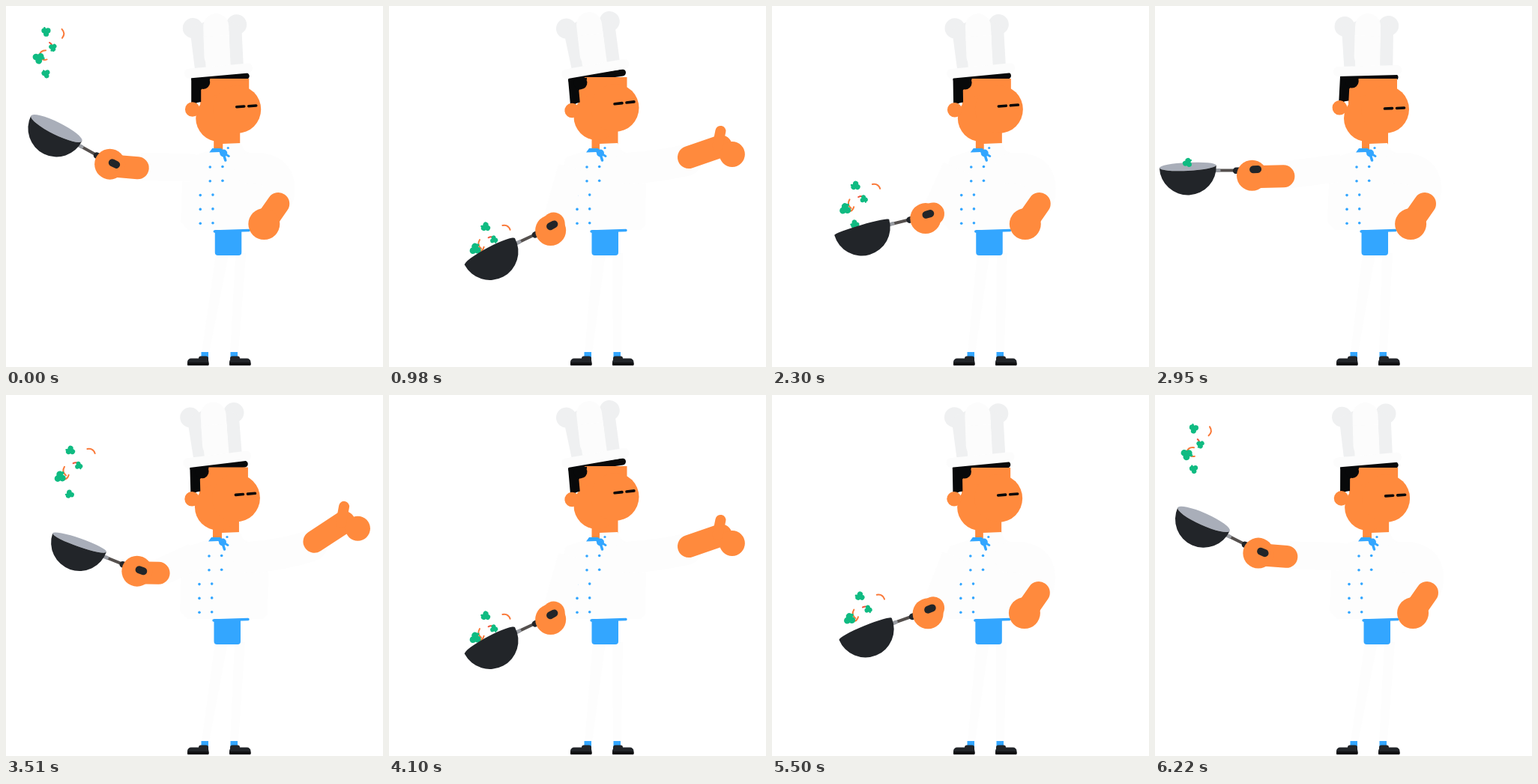
Animation of 503x482 px, one loop 6.24 s. Source, as an HTML page with a canvas:

```html
<!DOCTYPE html>
<html lang="en">
<head>
<meta charset="utf-8">
<title>Chef tossing vegetables</title>
<style>
html, body { margin: 0; width: 100%; height: 100%; overflow: hidden; background: #fff; }
canvas { display: block; }
</style>
</head>
<body>
<canvas id="stage" width="503" height="482"></canvas>
<script>
const c = document.getElementById('stage').getContext('2d');
const SKIN = '#ff8a3d', DARK = '#222529', BLUE = '#33a6ff', CLOTH = '#fdfdfd',
      GREY = '#eff0f1', GREEN = '#10bb82', RED = '#f0563c', HAIR = '#08090a';

// One toss: fling, sink, rest, wind up. The right arm gestures on every other toss.
const TOSS = 1560, FLING = -170, TOP = 130, CATCH = 980, WIND = 1230;

const level = { x: 43.5, y: 215, tilt: -3, rim: 5.5, drop: 16, armX: 42, armY: 1,
  body: -3, head: -1, headY: 0, turn: 3, hat: 0, hatY: 0, hatTurn: 2 };
const high = { x: 82, y: 159, tilt: 33, rim: 9, drop: 10, armX: 36, armY: 6,
  body: 1, head: .5, headY: 0, turn: -.7, hat: 0, hatY: 0, hatTurn: -2.5 };
const low = { x: 134.5, y: 328, tilt: -28, rim: -6, drop: 13, armX: 4, armY: -9,
  body: -8, head: -6.5, headY: -2, turn: -5, hat: -8, hatY: -2.5, hatTurn: -6.5 };
const lowCalm = { ...low, headY: 0, turn: -1, hat: -6, hatY: 0, hatTurn: -2 };

const lerp = (a, b, u) => a + (b - a) * u;
const span = (t, from, to) => Math.max(0, Math.min(1, (t - from) / (to - from)));
const smooth = u => u * u * (3 - 2 * u);
const easeOut = power => u => 1 - (1 - u) ** power;
const backOut = u => 1 + 2.7 * (u - 1) ** 3 + 1.7 * (u - 1) ** 2;

function blend(a, b, u, ease, special = {}) {
  const pose = {};
  for (const k in a) pose[k] = lerp(a[k], b[k], (special[k] || ease)(u));
  return pose;
}

function poseAt(q, bottom) {
  if (q < TOP)
    return blend(level, high, span(q, FLING, TOP), easeOut(2), { x: u => u ** .85, y: easeOut(3) });
  if (q < WIND) return blend(high, bottom, span(q, TOP, CATCH), smooth, { x: u => u });
  return blend(bottom, level, span(q, WIND, TOSS + FLING), smooth);
}

function poly(color, ...p) {
  c.fillStyle = color;
  c.beginPath();
  for (let i = 0; i < p.length; i += 2) c.lineTo(p[i], p[i + 1]);
  c.fill();
}
function disc(color, x, y, r) {
  c.fillStyle = color;
  c.beginPath();
  c.arc(x, y, r, 0, 7);
  c.fill();
}
function line(color, width, ...p) {
  c.strokeStyle = color;
  c.lineWidth = width;
  c.beginPath();
  for (let i = 0; i < p.length; i += 2) c.lineTo(p[i], p[i + 1]);
  c.stroke();
}
function box(color, x, y, w, h, r) {
  c.fillStyle = color;
  c.beginPath();
  c.roundRect(x, y, w, h, r);
  c.fill();
}
// Draw after moving by x, y and turning around px, py
function placed(x, y, deg, px, py, draw) {
  c.save();
  c.translate(x + px, y + py);
  c.rotate(deg * Math.PI / 180);
  c.translate(-px, -py);
  draw();
  c.restore();
}
function polar(x, y, r, deg) {
  const a = deg * Math.PI / 180;
  return [x + r * Math.cos(a), y + r * Math.sin(a)];
}

function legs(shift) {
  poly(CLOTH, 280 + shift, 330, 297 + shift, 330, 271, 463, 261, 463);
  poly(CLOTH, 306 + shift, 330, 320 + shift, 330, 310, 463, 299, 463);
  for (const [sock, shoe, heel] of [[260.5, 242, 257], [299.5, 298, 299]]) {
    box(BLUE, sock, 462, 9.5, 9, 0);
    box(DARK, heel, 467.5, 13, 11, 3);
    box(DARK, shoe, 470.5, 28.5, 9, [5, 5, 1, 1]);
    box('#0e0f11', shoe, 476, 28.5, 4, 1);
  }
}

function head(p) {
  const turned = draw => placed(p.head, p.headY, p.turn, 290, 115, draw);
  turned(() => line(HAIR, 9, 251.5, 97.5, 320, 93.5));
  placed(p.head, p.headY, 0, 0, 0, () => {
    box(SKIN, 277, 160, 35, 34, 0);
    box(SKIN, 259, 97, 65, 55, 0);
    disc(SKIN, 284, 150, 31);
    disc(SKIN, 308, 138, 32);
  });
  turned(() => {
    poly(HAIR, 247, 96, 272, 96, 272, 98, 260, 112, 260, 128, 255, 129, 247, 133);
    disc(HAIR, 263, 102, 9);
    disc(SKIN, 248.5, 138, 9.8);
  });
  placed(p.head, p.turn * .9, p.turn * .5, 320, 134, () => {
    line(HAIR, 3.6, 307.5, 134.7, 317.5, 134);
    line(HAIR, 3.6, 323.5, 133.7, 333.5, 133);
  });
  placed(p.hat, p.hatY, p.hatTurn, 284, 88, hat);
}

function hat() {
  disc(GREY, 251, 28.5, 13.5);
  disc(GREY, 309.5, 25.5, 13.5);
  poly(GREY, 247, 30, 268, 20, 268, 82, 252, 82);
  poly(GREY, 299, 20, 316, 30, 317, 80, 299, 80);
  box('#fcfcfc', 265, 10, 34, 74, 17);
  poly('#fcfcfc', 265, 40, 299, 40, 300, 84, 267, 84);
  placed(0, 0, -3.5, 284, 86, () => box('#fcfcfc', 238, 80, 91, 13, 6));
}

function torso() {
  poly(CLOTH, 268, 194, 318, 193, 345, 205, 351, 240, 350, 292, 344, 299,
    243, 299, 233, 288, 235, 235, 244, 202);
  poly(CLOTH, 289, 184, 313, 183, 320, 197, 289, 199);
  line(BLUE, 3.4, 278, 301, 324, 299.5);
  box(BLUE, 278.5, 299, 35.5, 34, [0, 0, 4, 4]);
  for (let i = 0; i < 5; i++) {
    const x = i < 2 ? 272 : 259, y = 215 + i * 18.8;
    disc(BLUE, x, y, 1.8);
    disc(BLUE, x + 16.7, y - .5, 1.8);
  }
  poly(BLUE, 271, 195.5, 275, 190, 287, 190, 292, 196, 289, 199, 284, 195);
  disc(BLUE, 290, 196.5, 5);
  line(BLUE, 3.5, 290, 198, 292.5, 206);
  line(BLUE, 3, 291, 197, 297, 200.5);
  disc(BLUE, 296, 189.5, 1.6);
}

// k: 0 = hand on the hip, 1 = stretched out
function rightArm(k) {
  const x = lerp(363, 408, k), y = lerp(264, 202, k);
  const length = lerp(33, 58, k), angle = lerp(125, -4, k);
  c.strokeStyle = CLOTH;
  c.lineWidth = 42;
  c.beginPath();
  c.moveTo(325, 217);
  c.quadraticCurveTo(370, 214, x - 4 * k, y - 10 + 14 * k);
  c.stroke();
  line(SKIN, 30, x, y, ...polar(x, y, length * .78, angle - 15 * k));
  disc(SKIN, ...polar(x, y, length, angle), lerp(21, 17, k));
  if (k > .05) {
    const [tx, ty] = polar(x, y, length * .76, angle - 16);
    line(SKIN, 14, tx - 3, ty, tx + 1, ty - 20 * k);
  }
}

const leaves = [[67, 10, 6.5], [53, 47, 8], [78, 31, 5.5], [66, 71, 6]];
const curls = [[95, 10, 7], [61, 48, 6], [59, 39, 7], [75, 28, 5]];

function panPoint(p, x, y) {
  return polar(...polar(p.x, p.y, x, p.tilt), y, p.tilt + 90);
}

// Place of a piece whose highest point is x, y
function piecePlace(x, y, q, p) {
  const lying = pan => panPoint(pan, (x - 67) * .6, Math.min(17, Math.hypot(x - 67, y - 10) - 4));
  if (q < TOP) {
    const [px, py] = lying(level), u = span(q, FLING, TOP);
    return [lerp(px, x, u ** 1.5), lerp(py, y, easeOut(2.5)(u))];
  }
  const fall = span(q, TOP, CATCH), settle = smooth(span(q, CATCH, CATCH + 150));
  const [px, py] = lying(p);
  return [lerp(x + 62 * fall, px, settle),
          lerp(lerp(y, 287 + y * .8, smooth(fall)), py, settle)];
}

function drawFood(q, p) {
  const spin = (TOP - Math.min(q, TOP)) * .45;
  const each = (list, draw) => list.forEach(([x, y, r], i) =>
    placed(...piecePlace(x, y, q, p), 30 + i * 115 + spin, 0, 0, () => draw(r, i)));
  each(curls, (r, i) => {
    c.strokeStyle = i == 3 ? RED : '#fa7a3a';
    c.lineWidth = 2;
    c.beginPath();
    c.moveTo(-r * .85, 1);
    c.quadraticCurveTo(0, -r * .6, r * .85, 1);
    c.stroke();
  });
  each(leaves, r => {
    for (let a = 0; a < 360; a += 120) disc(GREEN, ...polar(0, 0, r * .45, a), r * .55);
    line(GREEN, r * .4, 0, 0, -r * .8, r * .3);
  });
}

function panAndArm(q, p) {
  const [hx, hy] = panPoint(p, 85, p.drop);
  const ex = hx + p.armX, ey = hy + p.armY;
  const inPan = draw => placed(p.x, p.y, p.tilt, 0, 0, draw);
  c.lineCap = 'butt';
  line(CLOTH, 37, 252 + p.body, 216, ex + 4, ey - 2);
  c.lineCap = 'round';

  inPan(() => {
    line('#55504e', 4, 40, 7, 62, 8);
    line('#9a9da3', 5, 37.5, 7, 41, 7);
    line(DARK, 8.5, 64, 8.5, 84, 9);
    if (p.rim < 0) return;
    c.fillStyle = '#a9aeb9';
    c.beginPath();
    c.ellipse(0, 0, 38, p.rim, 0, 0, 7);
    c.fill();
  });
  drawFood(q, p);
  inPan(() => {
    const inside = p.rim > 0;
    c.fillStyle = DARK;
    c.beginPath();
    c.arc(0, 0, 38, 0, Math.PI);
    c.ellipse(0, 0, 38, Math.abs(p.rim), 0, Math.PI, inside ? 0 : 2 * Math.PI, inside);
    c.fill();
  });

  line(SKIN, 30, hx, hy + 2, ex, ey);
  disc(SKIN, hx, hy, 20.5);
  inPan(() => line(DARK, 10, 87, 8, 93, 8));
}

function frame() {
  const t = (performance.now() - FLING) % (2 * TOSS), q = t % TOSS + FLING;
  const gesture = t < TOSS;
  const p = poseAt(q, gesture ? low : lowCalm);
  const reach = gesture ? backOut(span(q, 110, 600)) - smooth(span(q, 1080, 1270)) : 0;
  c.fillStyle = '#fff';
  c.fillRect(0, 0, 503, 482);
  c.lineCap = c.lineJoin = 'round';
  legs(p.body);
  head(p);
  placed(p.body, 0, 0, 0, 0, () => {
    torso();
    rightArm(reach);
  });
  panAndArm(q, p);
  requestAnimationFrame(frame);
}
frame();
</script>
</body>
</html>
```
